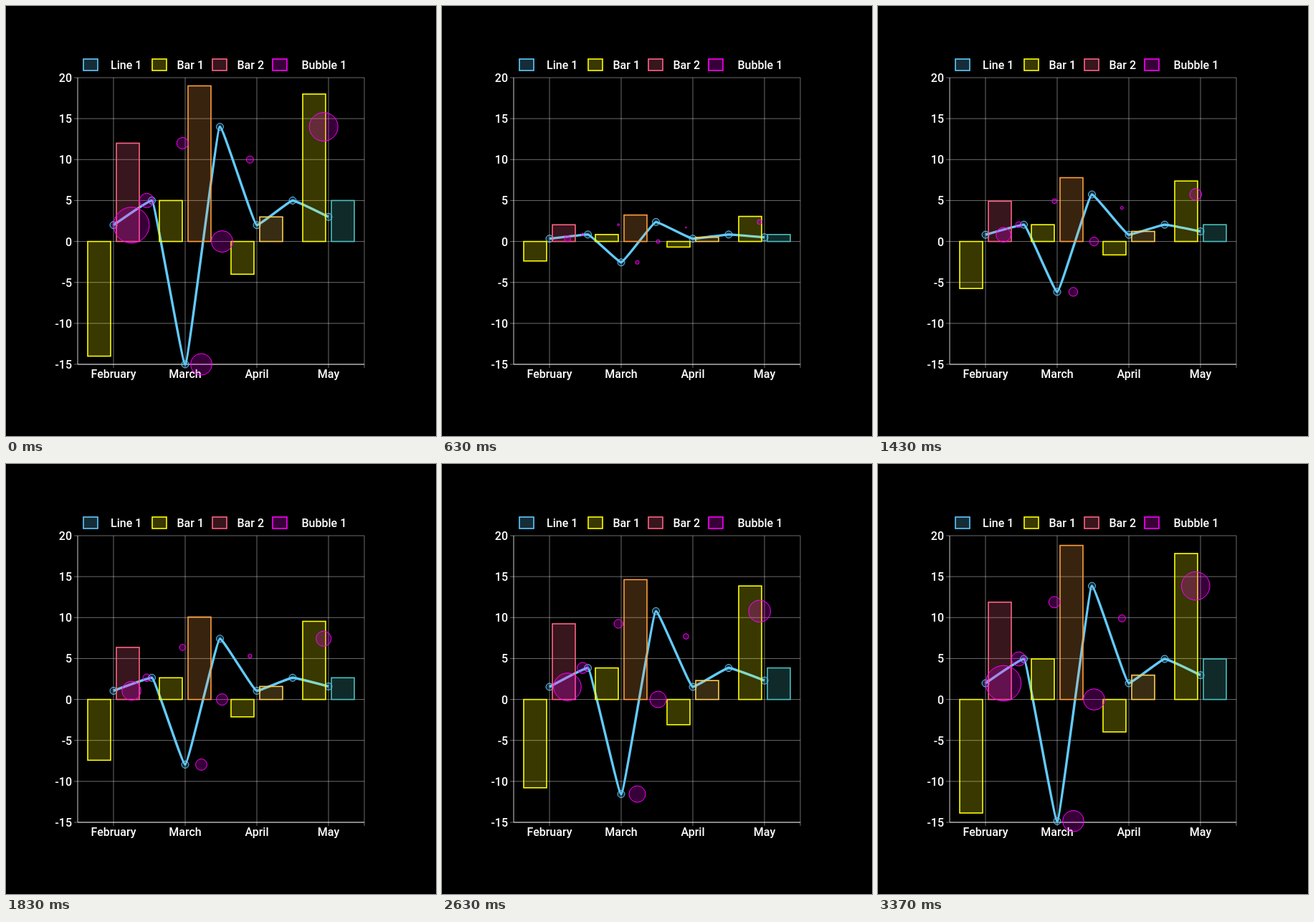
Write an HTML page with a canvas that moves like this. It is 600 px wide and 600 px high and loops after 3.4 s.

```html
<!DOCTYPE html>
<html lang="en">
<head>
<meta charset="utf-8">
<title>Mixed chart</title>
<style>
  html, body { margin: 0; width: 100%; height: 100%; overflow: hidden; background: #000; }
  canvas { display: block; width: 600px; height: 600px; }
</style>
</head>
<body>
<canvas id="chart" width="600" height="600"></canvas>
<script>
const ctx = document.getElementById('chart').getContext('2d');
const LOOP = 3400, LEFT = 100, RIGHT = 500, TOP = 100, BOTTOM = 500;
const UNIT = (BOTTOM - TOP) / 35, ZERO = TOP + 20 * UNIT;

const BLUE = [98, 203, 255], YELLOW = [255, 255, 0], PINK = [255, 99, 132];
const ORANGE = [255, 159, 64], GOLD = [255, 205, 86], TEAL = [75, 192, 192];
const MAGENTA = [255, 0, 255];

const months = ['February', 'March', 'April', 'May'];
const legend = [
  ['Line 1', BLUE, 108, 146],
  ['Bar 1', YELLOW, 204, 238.5],
  ['Bar 2', PINK, 288, 322.5],
  ['Bubble 1', MAGENTA, 372, 412.5]
];
const line = [[150, 2], [203.5, 5], [250, -15], [298.5, 14], [350, 2], [400, 5], [450, 3]];
const bars1 = [-14, 5, -4, 18];
const bars2 = [12, 19, 3, 5];
const bars2Colors = [PINK, ORANGE, GOLD, TEAL];
// x, value, radius
const bubbles = [
  [175, 2, 25], [196.3, 5, 10], [246.2, 12, 8], [272.5, -15, 15],
  [301.5, 0, 15], [340.4, 10, 5], [443.2, 14, 20]
];

const rgba = (c, a = 1) => `rgba(${c},${a})`;
const yOf = v => ZERO - v * UNIT;

function style(color, width) {
  ctx.fillStyle = rgba(color, 0.22);
  ctx.strokeStyle = rgba(color);
  ctx.lineWidth = width;
}

function box(x, y, w, h, color) {
  style(color, 1.6);
  ctx.fillRect(x, y, w, h);
  ctx.strokeRect(x, y, w, h);
}

function circle(x, y, r, color) {
  style(color, 1);
  ctx.beginPath();
  ctx.arc(x, y, r, 0, Math.PI * 2);
  ctx.fill();
  ctx.stroke();
}

function rule(x1, y1, x2, y2, alpha = 0.42) {
  ctx.strokeStyle = `rgba(255,255,255,${alpha})`;
  ctx.lineWidth = 1;
  ctx.beginPath();
  ctx.moveTo(x1, y1);
  ctx.lineTo(x2, y2);
  ctx.stroke();
}

function label(text, x, y, align) {
  ctx.fillStyle = '#fff';
  ctx.textAlign = align;
  ctx.fillText(text, x, y);
}

function drawFrame() {
  ctx.font = '500 16px Roboto, sans-serif';
  for (let v = 20; v >= -15; v -= 5) {
    const y = yOf(v);
    rule(LEFT - 5, y, RIGHT, y);
    label(v, 92, y + 6, 'right');
  }
  months.forEach((name, i) => {
    const x = 150 + i * 100;
    rule(x, TOP, x, BOTTOM + 5);
    label(name, x, 519, 'center');
  });
  rule(RIGHT, TOP, RIGHT, BOTTOM + 5);
  rule(LEFT, TOP, LEFT, BOTTOM, 0.8);
  rule(LEFT, BOTTOM, RIGHT, BOTTOM, 0.8);
  for (const [name, color, x, textX] of legend) {
    box(x, 74, 20, 16, color);
    label(name, textX, 88, 'left');
  }
}

function drawLine(p) {
  const pts = line.map(([x, v]) => [x, yOf(v * p)]);
  const last = pts.length - 1;
  style(BLUE, 3.4);
  ctx.lineJoin = 'round';
  ctx.beginPath();
  ctx.moveTo(...pts[0]);
  for (let i = 0; i < last; i++) {
    const [x1, y1] = pts[i], [x2, y2] = pts[i + 1];
    const h = (x2 - x1) * 0.09;
    ctx.bezierCurveTo(i ? x1 + h : x1, y1, i + 1 < last ? x2 - h : x2, y2, x2, y2);
  }
  ctx.stroke();
  ctx.lineJoin = 'miter';
  for (const [x, y] of pts) circle(x, y, 5, BLUE);
}

function drawBars(values, offset, p, colorOf) {
  values.forEach((v, i) => {
    const y = yOf(v * p);
    box(LEFT + i * 100 + offset, Math.min(y, ZERO), 32, Math.abs(y - ZERO), colorOf(i));
  });
}

function draw(p) {
  ctx.fillStyle = '#000';
  ctx.fillRect(0, 0, 600, 600);
  drawFrame();
  drawLine(p);
  drawBars(bars1, 14, p, () => YELLOW);
  drawBars(bars2, 54, p, i => bars2Colors[i]);
  if (p > 0) {
    for (const [x, v, r] of bubbles) circle(x, yOf(v * p), r * p, MAGENTA);
  }
}

// Thirty steps a second, held 30, 40 and 30 ms in turn.
function stepAt(t) {
  const r = t % 100;
  return Math.floor(t / 100) * 3 + (r >= 70 ? 2 : r >= 30 ? 1 : 0);
}

// The finished chart shows first, then everything grows from zero.
function progress(step) {
  return step === 0 ? 1 : Math.max(0, (step - 2) / 100);
}

const start = performance.now();
function tick() {
  draw(progress(stepAt((performance.now() - start) % LOOP)));
  requestAnimationFrame(tick);
}
tick();
</script>
</body>
</html>
```
